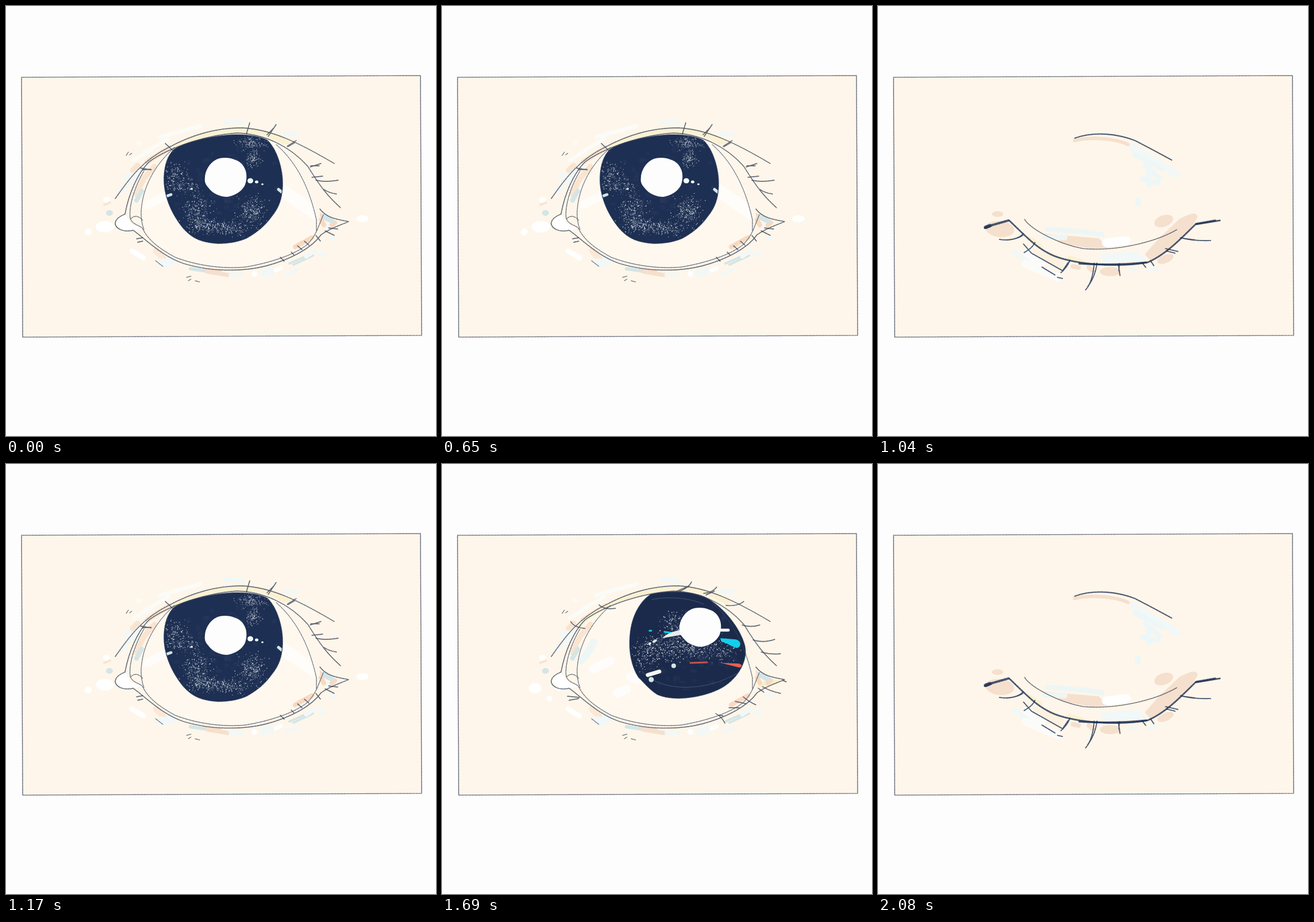
Recreate the animation shown at these times as an HTML page with a canvas. Size 748 by 748 pixels, loop 2.21 s.

```html
<!DOCTYPE html>
<html lang="en">
<head>
<meta charset="utf-8">
<title>Blinking eye</title>
<style>
html, body { margin: 0; width: 100%; height: 100%; overflow: hidden; background: #fdfdfd; }
canvas { display: block; width: 100vw; height: 100vh; }
</style>
</head>
<body>
<canvas id="stage" width="748" height="748"></canvas>
<script>
const SIZE = 748, STEP = 130;
const INK = '#3b4458', NAVY = '#1d2f52', SKIN = '#fef6ea', WHITE = '#fff', PAPER = '#fdfdfd';
const PALE = '#f1f8f7', BLUE = '#d5e5e6', PEACH = '#fae4d0', TAN = '#f5e0cd', YELLOW = '#fbf1d1';
const CYAN = '#12cfe9', RED = '#e95f53';

let ctx, seed;
const rand = () => (seed = (seed * 16807) % 2147483647) / 2147483647;
const spread = () => rand() + rand() + rand() - 1.5;

function fill(color, d) {
  ctx.fillStyle = color;
  ctx.fill(new Path2D(d));
}
function dab(color, width, d) {
  ctx.strokeStyle = color;
  ctx.lineWidth = width;
  ctx.stroke(new Path2D(d));
}
function oval(color, x, y, rx, ry = rx, turn = 0) {
  ctx.fillStyle = color;
  ctx.beginPath();
  ctx.ellipse(x, y, rx, ry, turn, 0, 7);
  ctx.fill();
}
// Solid soft stroke below a broken one gives a pencil grain.
function pencil(d, width = 1.3, color = INK) {
  ctx.save();
  ctx.globalAlpha = .68;
  dab(color, width, d);
  ctx.globalAlpha = .5;
  ctx.lineCap = 'butt';
  ctx.setLineDash([1.6, .7, 2.3, 1.1]);
  dab(color, width + .4, d);
  ctx.restore();
}
function specks(x, y, sx, sy, count, alpha = .8) {
  ctx.fillStyle = '#dfe3e6';
  for (let i = 0; i < count; i++) {
    const r = .7 + rand() * 1.1;
    ctx.globalAlpha = alpha * (.35 + rand() * .65);
    ctx.fillRect(x + spread() * sx, y + spread() * sy, r, r);
  }
  ctx.globalAlpha = 1;
}

function panel() {
  const frame = 'M27 124L721 121L723 573L29 576Z';
  fill(PAPER, 'M0 0H748V748H0Z');
  fill(SKIN, frame);
  pencil(frame, 1.2, '#444d62');
}

function skinTone() {
  dab('#fbfbf8', 7, 'M240 256L282 231M268 228L338 209M222 268L250 252');
  oval('#fbfbf8', 231, 238, 4);
  dab(PALE, 8, 'M382 201L410 202M486 222L506 222M206 297L213 293');
  dab(PALE, 9, 'M214 308L230 286M200 322L207 314');
  dab(PEACH, 9, 'M220 286L229 277M246 271L284 247');
  dab(PEACH, 4, 'M171 346L181 342');
  oval(WHITE, 175, 337, 6, 5);
  oval(BLUE, 180, 360, 6, 5);
  dab(WHITE, 9, 'M219 426L239 438');
  dab('#fde8d6', 11, 'M261 426L273 438');
  dab(PALE, 14, 'M270 446L279 448M286 440L287 444');
  dab(BLUE, 6, 'M321 457L363 463');
  dab(TAN, 7, 'M350 462L386 468');
  dab(PALE, 6, 'M390 468L412 468M488 466L506 459');
  oval(WHITE, 432, 466, 5);
  dab(PALE, 13, 'M448 465L460 462');
  dab(WHITE, 7, 'M469 460L478 456');
  dab(BLUE, 4, 'M493 448L536 429M500 450L534 434');
  dab(PALE, 7, 'M522 436L538 426M567 406L572 403');
  oval(PALE, 549, 432, 7, 5);
}

function lidTone() {
  dab(PEACH, 9, 'M227 328L240 300L258 279');
  dab(BLUE, 8, 'M227 338L236 322');
  dab('#f8d9c0', 8, 'M503 419L532 403M548 372L553 381M567 381L572 377');
  dab(BLUE, 9, 'M551 366L567 374');
  dab('#f8d9c0', 3, 'M547 361L550 373M344 457L374 461');
}

const EYEBALL = 'M292 246C254 274 235 320 236 362C238 386 251 407 280 430C320 453 380 459 430 451C485 440 530 420 539 389C542 358 525 295 490 258C467 232 440 223 400 222C360 224 320 230 292 246Z';

function openLids() {
  pencil('M190 335C211 306 234 270 283 246C331 220 372 212 410 212C461 214 510 238 571 274');
  pencil('M207 362C214 325 229 291 249 271C285 245 350 224 402 221C449 222 494 244 525 279C548 316 559 330 582 351');
  pencil('M207 362C197 366 190 371 190 379C192 389 207 394 221 390C246 408 271 435 309 448C355 462 410 463 453 452C494 441 531 422 548 398C565 386 580 382 596 375C574 371 557 368 546 353');
  pencil('M240 287C226 310 213 346 216 369C220 382 235 381 238 388C248 408 267 422 294 437C330 451 376 458 417 454C458 447 503 433 525 414C536 402 540 393 544 383L552 363', 1);
  pencil('M293 246C259 276 237 315 235 359Q235 376 240 389M470 241C509 275 529 322 540 372L540 391', .9);
  pencil('M217 370Q227 360 238 373', .9);
  pencil('M209 260L213 254M215 259L219 256M260 443L273 453M314 472L322 470M317 478L322 475M329 478L337 480', 1);
}

function drawIris({ color, iris, pupil: [x, y], stars, glints, shift = [0, 0] }) {
  ctx.save();
  ctx.translate(...shift);
  fill(color, iris);
  ctx.save();
  ctx.clip(new Path2D(iris));
  for (let i = 0; i < 90; i++) {
    ctx.globalAlpha = .07;
    oval('#52658a', x + spread() * 75, 320 + spread() * 70, 2 + rand() * 6, 2 + rand() * 4);
  }
  ctx.globalAlpha = 1;
  stars.forEach(s => specks(...s));
  glints();
  ctx.restore();
  pencil(iris, 1.3, NAVY);
  ctx.translate(x, y);
  fill(PAPER, 'M-36 1C-36 -11 -28 -25 -16 -31C-9 -35 7 -35 15 -31C23 -29 30 -23 33 -16C38 -7 37 7 33 15C27 25 16 32 3 34C-10 34 -23 28 -30 18C-35 13 -37 7 -36 1Z');
  ctx.restore();
}

function openEye(pose) {
  panel();
  skinTone();
  pose.around();
  fill('#fff8ef', EYEBALL);
  fill(WHITE, 'M207 362C190 365 188 385 200 389L221 390L237 387L218 379Z');
  fill(YELLOW, pose.shade);
  lidTone();
  ctx.save();
  ctx.clip(new Path2D(EYEBALL));
  pose.sclera();
  ctx.restore();
  drawIris(pose);
  openLids();
  pencil(pose.lashes, 1.4);
}

const ahead = {
  color: NAVY,
  pupil: [382, 298],
  iris: 'M292 250C312 236 362 225 401 224C425 224 444 228 455 234C472 251 482 285 481 313C480 335 475 350 462 366C450 383 436 394 418 404C402 411 386 413 369 413C340 411 325 405 308 386C286 359 274 327 275 298C276 275 282 260 292 250Z',
  shade: 'M289 244C340 217 391 211 423 213C450 214 477 225 500 239L482 241C451 223 430 220 400 221C360 223 319 232 289 251Z',
  stars: [[295, 298, 22, 25, 190], [427, 238, 25, 13, 160], [429, 266, 14, 16, 120], [331, 356, 28, 27, 230],
    [426, 358, 24, 25, 280], [386, 385, 40, 13, 220], [342, 380, 25, 14, 160], [324, 316, 16, 14, 50]],
  lashes: 'M277 239L293 254M234 282L253 285M237 285L252 284M424 203L418 223M470 206L456 227M467 211L454 224M505 234L489 244M502 238L490 245M548 274L529 280M545 278L530 278M551 296L532 298M578 303Q555 307 539 303M575 327Q561 325 553 319M227 405L238 403M229 411L238 409M577 388L561 386M571 399L555 391M547 409L539 399M527 416L519 409M515 424L507 417M501 433L496 428M484 444L477 437',
  around() {
    oval(WHITE, 143, 393, 6);
    oval(WHITE, 172, 384, 16, 10);
    oval(WHITE, 620, 370, 11, 6);
    dab(PALE, 7, 'M290 248L302 244M558 383L570 380');
  },
  sclera() {
    dab('#fffdfa', 22, 'M478 319L540 362');
    dab('#fffdfa', 14, 'M245 346L282 328');
  },
  glints() {
    dab(BLUE, 5, 'M276 332L287 328M474 319L480 324');
    oval(PALE, 425, 304, 5, 4.5);
    oval(PALE, 436, 306, 3, 2.5);
    oval(PALE, 446, 310, 2, 1.5);
    oval(BLUE, 323, 318, 2);
  }
};

const aside = {
  color: '#1e2b4b',
  pupil: [413, 287],
  iris: 'M335 239C350 231 372 225 405 224C438 222 466 232 489 254C504 271 512 294 511 313C510 340 497 361 482 376C468 391 452 402 430 408C405 413 378 414 357 402C329 383 304 348 303 312C302 285 311 259 335 239Z',
  shade: 'M289 244C340 217 391 211 430 213C477 219 523 246 567 273L553 280L530 279C507 257 469 229 433 222C388 218 334 230 289 251Z',
  stars: [[344, 264, 25, 25, 220], [382, 252, 24, 18, 100], [386, 330, 32, 20, 430, 1], [385, 379, 38, 20, 280],
    [338, 376, 20, 18, 130], [465, 342, 32, 27, 280], [481, 270, 22, 25, 110], [440, 378, 30, 20, 130]],
  lashes: 'M276 238Q282 250 300 251M279 244L293 253M221 283Q239 289 254 286M431 202Q429 214 420 221M426 213L416 222M479 209Q475 219 461 224M475 216L457 227M522 236Q508 243 489 243M511 240L490 244M570 274Q548 280 530 279M584 299Q562 306 540 303M580 328Q563 328 552 320M213 401Q228 405 239 402M221 411Q235 409 243 405M576 401Q561 400 550 391M548 410Q537 411 529 405M530 416L514 411M520 423L506 417M490 447Q482 441 478 436M508 432L491 429',
  around() {
    oval(WHITE, 165, 389, 11, 8);
    oval(WHITE, 186, 407, 5);
    oval('#fffdf8', 588, 330, 8, 6);
    oval(PALE, 469, 477, 7, 4);
    dab(PALE, 8, 'M291 248L311 243');
    fill('#faf0c8', 'M476 440L499 431L505 437L491 452Z');
  },
  sclera() {
    dab(PALE, 9, 'M247 353L298 331M247 326L263 306M281 329L315 316');
    dab('#fffdfa', 15, 'M257 390L303 370');
  },
  glints() {
    dab('#405474', 1, 'M373 258C390 239 430 238 455 252M370 310C388 335 435 335 458 310M350 394Q410 410 462 390');
    dab(CYAN, 3, 'M304 300L344 286L378 284M304 295L337 288M320 294L376 288');
    dab(CYAN, 6, 'M357 280L378 280M305 297L315 294');
    dab(CYAN, 16, 'M438 265L457 270');
    dab('#e0e4e7', 9, 'M301 315L312 314');
    dab('#dce1e5', 5, 'M334 303L342 304M366 295L375 294');
    fill(WHITE, 'M448 299C458 293 475 299 484 312C472 311 461 307 449 306Z');
    dab(RED, 2, 'M317 357L352 351');
    dab('#ef7466', 9, 'M365 347L375 347');
    dab(RED, 9, 'M405 339L415 339');
    dab(RED, 13, 'M423 337L439 337');
    specks(371, 347, 9, 5, 25);
    specks(411, 339, 9, 5, 15);
  }
};

const far = {
  color: '#1b2a4b',
  pupil: [449, 284],
  iris: 'M363 227C390 220 431 221 456 231C490 248 518 286 526 314C534 343 512 377 481 392C449 407 402 413 375 401C359 391 351 379 342 371C329 351 325 324 327 300C329 270 341 242 363 227Z',
  shade: 'M229 289C251 260 309 229 350 220C407 207 458 214 503 239L496 247C466 224 421 216 379 222C329 231 273 251 241 284Z',
  stars: [[402, 273, 22, 17, 120], [363, 323, 35, 20, 210, 1], [427, 320, 60, 20, 350, 1], [397, 300, 34, 18, 120],
    [483, 326, 32, 20, 110], [354, 347, 23, 15, 60]],
  lashes: 'M273 245Q283 254 302 251M224 274Q229 284 249 286M434 205Q430 215 412 222M430 212L407 222M478 214Q470 224 455 225M474 221L459 228M525 239Q514 248 494 246M553 280Q537 285 522 280M579 305Q559 312 541 306M589 330Q573 332 555 327M218 404L239 406M221 411L238 408M589 399Q570 395 557 387M560 397L550 390M546 419Q533 413 524 405M529 417L510 413M517 424L499 424M492 451Q487 440 476 434M489 438L482 437M592 376L599 379',
  around() {
    oval(WHITE, 162, 390, 11, 9);
    oval(WHITE, 187, 408, 5);
    dab(PALE, 8, 'M281 253L311 243');
    fill('#faf0c8', 'M546 389L564 374L597 377L572 385Z');
    fill(WHITE, 'M207 364C188 370 188 391 204 396L222 391L218 377Z');
  },
  sclera() {
    dab('#eef6f6', 13, 'M242 342L251 332M254 328L264 310');
    dab('#fffdfc', 15, 'M264 356L292 343M305 399L321 392M328 370L340 375');
    oval(BLUE, 222, 368, 5);
  },
  glints() {
    dab('#405474', 1, 'M348 360C370 391 448 403 515 363M365 236C395 229 435 234 455 244');
    fill(CYAN, 'M484 303L509 305C521 306 522 318 513 320C505 319 498 312 486 309Z');
    dab(CYAN, 3, 'M361 290L364 290M387 292L401 294');
    fill('#e8ebed', 'M383 303C392 294 404 291 417 288L416 297C407 299 394 301 383 303Z');
    dab(WHITE, 5, 'M485 289L498 289');
    dab('#dfe5e8', 4, 'M361 313L362 312M368 309L372 307');
    dab('#c6524e', 3, 'M432 346L461 345');
    fill(RED, 'M485 346L515 347C523 348 523 353 517 354Z');
    dab('#f5f7f5', 7, 'M358 367L378 361');
    oval(BLUE, 403, 351, 4);
    oval(BLUE, 364, 375, 4.5);
  }
};

// The gaze passes through these on its way to the right.
const turning = {
  ...aside,
  shift: [-15, 3],
  around() {
    oval(WHITE, 149, 392, 6);
    oval(WHITE, 169, 386, 14, 9);
    oval(WHITE, 604, 350, 9, 6);
    dab(PALE, 8, 'M291 248L308 243');
  }
};
const drifting = { ...aside, shift: [15, -1], around: far.around };

function closedEye() {
  panel();
  dab(TAN, 6, 'M342 234C365 228 411 229 435 241');
  dab(PALE, 12, 'M442 246L521 293');
  dab('#edf7f7', 9, 'M447 259L493 283M465 278L490 300M460 301L487 308M451 337L453 345M470 290L472 311');
  oval(PALE, 437, 358, 4, 2);
  oval(TAN, 208, 362, 10, 5);
  oval(TAN, 212, 388, 25, 14, .1);
  oval(TAN, 497, 374, 17, 10, -.35);
  fill(TAN, 'M464 432L490 403L525 370Q555 354 556 367L543 389L499 430L475 444Z');
  fill(TAN, 'M287 396L384 404L400 421L370 422L320 413Z');
  dab('#eef6f5', 9, 'M294 388L356 393L390 398M325 403L290 402');
  dab(WHITE, 15, 'M397 412L432 408');
  dab(PALE, 9, 'M390 436L452 431M397 443L459 439M236 428L270 449');
  dab('#fbfcfa', 14, 'M257 448L313 472M258 429L284 448');
  dab('#fbf1d3', 9, 'M263 405L281 417M297 432L316 442M333 439L356 446');
  fill('#fdf1df', 'M270 421L324 444L319 461L269 430Z');
  oval(TAN, 404, 462, 18, 8);
  oval(TAN, 500, 440, 15, 7, -.4);
  dab(TAN, 8, 'M339 453L349 455M367 455L374 461');
  dab(PALE, 6, 'M438 460L450 461M468 460L486 456');

  pencil('M342 230C378 217 418 223 447 234Q478 250 511 268', 1.8, NAVY);
  pencil('M255 371C264 387 312 414 357 422C413 427 480 412 520 389', 1.2);
  pencil('M186 386L199 381L227 373', 3.7, NAVY);
  pencil('M187 385L195 382', 6, NAVY);
  pencil('M228 373C256 399 274 421 307 435C352 452 425 454 469 446C498 434 524 408 552 380L595 373', 2.5, NAVY);
  pencil('M350 448Q410 452 467 446M553 379L587 373', 3.2, NAVY);
  pencil('M211 406Q239 410 253 396M224 407Q241 406 252 399M253 414L267 430L322 461M273 411Q269 421 254 429M334 442Q329 455 318 464M331 446L322 459M285 454L308 468M312 472L321 474M376 447Q374 479 361 494M381 447Q378 471 365 488M418 449L421 469M420 448L419 461M459 446L466 455M474 443L480 452M500 422L522 427M501 426L517 430M526 403Q548 409 579 408M530 404L552 407', 1.6, NAVY);
}

function render(draw, pose) {
  const canvas = document.createElement('canvas');
  canvas.width = canvas.height = SIZE;
  ctx = canvas.getContext('2d');
  ctx.lineCap = ctx.lineJoin = 'round';
  seed = 4711;
  draw(pose);
  return canvas;
}

const pictures = { closed: render(closedEye) };
for (const [name, pose] of Object.entries({ ahead, turning, aside, drifting, far })) {
  pictures[name] = render(openEye, pose);
}
// Long look, two quick blinks, glance to the right, shut.
const timeline = [
  ['ahead', 6], ['closed', 1], ['ahead', 1], ['closed', 1], ['ahead', 1],
  ['turning', 1], ['aside', 1], ['drifting', 1], ['far', 3], ['closed', 1]
].flatMap(([name, steps]) => Array(steps).fill(pictures[name]));

const stage = document.getElementById('stage').getContext('2d');
const start = performance.now();
function play(now) {
  const step = Math.floor(Math.max(0, now - start) / STEP) % timeline.length;
  stage.drawImage(timeline[step], 0, 0);
  requestAnimationFrame(play);
}
play(start);
</script>
</body>
</html>
```
